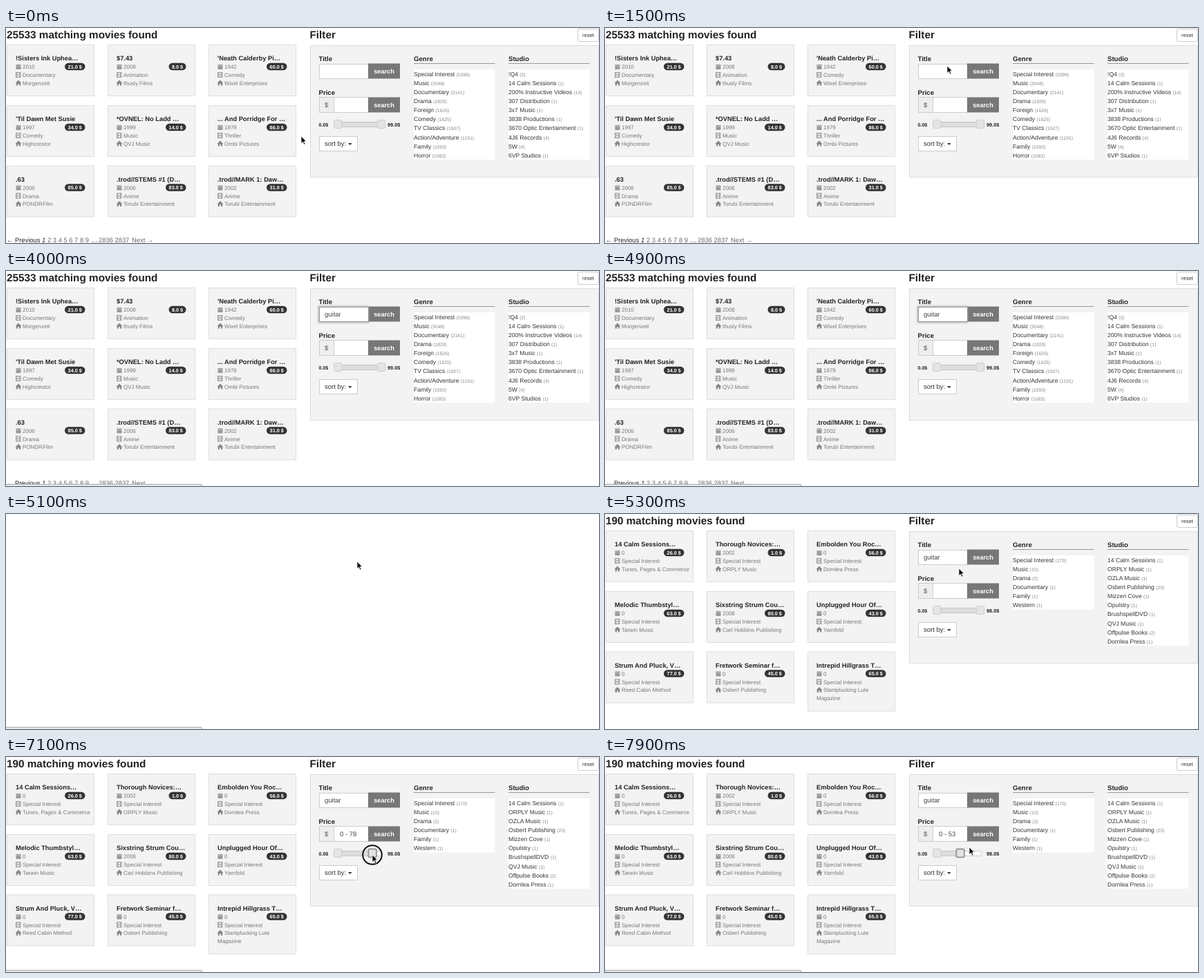
Recreate the animation shown at these times as an HTML page. Size 858 px wide and 312 px high, loop 8000 ms.

```html
<!DOCTYPE html>
<html lang="en">
<head>
<meta charset="utf-8">
<title>Movie search</title>
<style>
html, body { margin: 0; width: 100%; height: 100%; overflow: hidden; background: #fff; }
svg { display: block; font-family: "Liberation Sans", Arial, sans-serif; text-rendering: geometricPrecision; }
text { white-space: pre; }
.b { font-weight: bold; }
</style>
</head>
<body>
<svg id="stage" width="858" height="312" viewBox="0 0 858 312"></svg>
<script>
const LOOP = 8000, STEP = 100;

const text = (x, y, s, size, fill = '#333', more = '') =>
  `<text x="${x}" y="${y}" font-size="${size}" fill="${fill}" ${more}>${s.replace(/&/g, '&amp;')}</text>`;
const bold = (x, y, s, size, fill = '#222', more = '') => text(x, y, s, size, fill, 'class="b" ' + more);
const rect = (x, y, w, h, fill, stroke = 'none', more = '') =>
  `<rect x="${x}" y="${y}" width="${w}" height="${h}" fill="${fill}" stroke="${stroke}" ${more}/>`;
const path = (d, fill, more = '') => `<path d="${d}" fill="${fill}" ${more}/>`;

const icons = {
  calendar: (x, y) => rect(x, y + 1, 7, 7, '#999') + path(`M${x} ${y + 3}h7M${x + 2} ${y}v2M${x + 5} ${y}v2`, 'none', 'stroke="#ccc" stroke-width=".7"'),
  film: (x, y) => rect(x + .5, y + .5, 6.5, 7, 'none', '#999') + path(`M${x + 2} ${y}v8M${x + 5.5} ${y}v8M${x + 2} ${y + 4}h3.5`, 'none', 'stroke="#999"'),
  home: (x, y) => path(`M${x - .5} ${y + 4.5}l4.5 -4.5l4.5 4.5h-1.3v3.5h-2.2v-2.5h-2v2.5h-2.2v-3.5z`, '#888')
};

function card([title, year, genre, studio, price], i) {
  const x = 1 + i % 3 * 146, y = [25, 113, 200.5][i / 3 | 0];
  const lines = studio.split('|'), pill = price.length > 3 ? 29.5 : 25;
  return rect(x + .5, y - .5, 126, 74 + 12 * (lines.length - 1), '#f3f3f3', '#ddd') +
    bold(x + 13, y + 22.3, title, 9.3) +
    icons.calendar(x + 13.5, y + 27) + text(x + 23, y + 34, year, 8, '#777') +
    icons.film(x + 13, y + 39) + text(x + 23, y + 46, genre, 8, '#777') +
    icons.home(x + 13, y + 50.5) + text(x + 23, y + 57.7, lines[0], 8, '#777') +
    (lines[1] ? text(x + 13, y + 69.5, lines[1], 8, '#777') : '') +
    rect(x + 113.5 - pill, y + 25.7, pill, 10.6, '#333', 'none', 'rx="5.3"') +
    bold(x + 113.5 - pill / 2, y + 33.6, price + ' $', 7.3, '#fff', 'text-anchor="middle"');
}

function list(x, head, items) {
  return bold(x, 47.8, head, 9.6) + rect(x, 51, 117.5, 1, '#999') +
    rect(x, 60, 117.5, items.length * 13.1, '#fff') +
    items.map((item, i) => {
      const [name, count] = item.split('|');
      return text(x, 69.8 + i * 13.1, `${name} <tspan font-size="6.8" fill="#888">(${count})</tspan>`, 8.6);
    }).join('');
}

const button = y => rect(524, y, 46, 22, '#777') + bold(547, y + 14, 'search', 9.2, '#fff', 'text-anchor="middle"');

const filter = bold(439.5, 15.2, 'Filter', 15.3) +
  rect(827.5, 1.5, 30, 18, '#fff', '#ccc', 'rx="1"') + text(842.5, 13, 'reset', 7.6, '#333', 'text-anchor="middle"') +
  rect(440.5, 25.5, 417, 191, '#f3f3f3', '#ddd') +
  bold(452.5, 47.8, 'Title', 9.6) + rect(453.5, 52.5, 71, 21, '#fff', '#ccc') + button(51.5) +
  bold(452.5, 97, 'Price', 9.6) + rect(453.5, 100.5, 21, 22, '#eee', '#ccc') +
  text(461, 115, '$', 9.5, '#555') + rect(474.5, 100.5, 50, 22, '#fff', '#ccc') + button(100.5) +
  bold(452.5, 143, '0.0$', 7.1) +
  rect(475.5, 136.5, 69, 7, '#fff', '#ccc', 'rx="2"') +
  rect(453.5, 157.5, 55, 21, '#fff', '#ccc') + text(461, 171, 'sort by:', 9.5) + path('M495 167h5.6l-2.8 3z', '#333');

function page({ count, cards, genres, studios, max }) {
  return bold(1, 15.2, count + ' matching movies found', 15.3) + cards.map(card).join('') + filter +
    bold(552, 143, max + '$', 7.3) + list(590, 'Genre', genres) + list(727, 'Studio', studios);
}

const pager = [[1, '← Previous', '#222'], [60, '2 3 4 5 6 7 8 9', '#666'], [123, '…', '#222'],
  [134, '2836 2837', '#666'], [182, 'Next →', '#666']].map(([x, s, c]) => text(x, 310.5, s, 9.4, c)).join('') +
  text(52, 310.5, '1', 9.4, '#222', 'font-style="italic"');

const all = {
  count: 25533, max: '99.0',
  cards: [
    ['!Sisters Ink Uphea…', '2010', 'Documentary', 'Morgenzeit', '21.0'],
    ['$7.43', '2008', 'Animation', 'thusly Films', '8.0'],
    ["'Neath Calderby Pi…", '1942', 'Comedy', 'Wixel Enterprises', '60.0'],
    ["'Til Dawn Met Susie", '1997', 'Comedy', 'Highcrestor', '34.0'],
    ['*OVNEL: No Ladd …', '1999', 'Music', 'QVJ Music', '14.0'],
    ['... And Porridge For …', '1979', 'Thriller', 'Ombi Pictures', '86.0'],
    ['.63', '2006', 'Drama', 'PONDRFilm', '85.0'],
    ['.trod//STEMS #1 (D…', '2006', 'Anime', 'Torubi Entertainment', '83.0'],
    ['.trod//MARK 1: Daw…', '2002', 'Anime', 'Torubi Entertainment', '31.0']
  ],
  genres: ['Special Interest|5396', 'Music|3048', 'Documentary|2141', 'Drama|1829', 'Foreign|1626',
    'Comedy|1625', 'TV Classics|1507', 'Action/Adventure|1191', 'Family|1093', 'Horror|1083'],
  studios: ['!Q4|2', '14 Calm Sessions|1', '200% Instructive Videos|14', '307 Distribution|1', '3x7 Music|1',
    '3838 Productions|1', '3670 Optic Entertainment|1', '4J6 Records|4', '5W|4', '6VP Studios|1']
};

const found = {
  count: 190, max: '98.0',
  cards: [
    ['14 Calm Sessions…', '0', 'Special Interest', 'Tunes, Pages & Commerce', '26.0'],
    ['Thorough Novices:…', '2002', 'Special Interest', 'ORPLY Music', '1.0'],
    ['Embolden You Roc…', '0', 'Special Interest', 'Dornlea Press', '56.0'],
    ['Melodic Thumbstyl…', '0', 'Special Interest', 'Tarwin Music', '63.0'],
    ['Sixstring Strum Cou…', '2008', 'Special Interest', 'Carl Hobbins Publishing', '80.0'],
    ['Unplugged Hour Of…', '0', 'Special Interest', 'Yarnfold', '43.0'],
    ['Strum And Pluck, V…', '0', 'Special Interest', 'Reed Cabin Method', '77.0'],
    ['Fretwork Seminar f…', '0', 'Special Interest', 'Osbert Publishing', '45.0'],
    ['Intrepid Hillgrass T…', '0', 'Special Interest', 'Slantplucking Lute|Magazine', '65.0']
  ],
  genres: ['Special Interest|170', 'Music|15', 'Drama|2', 'Documentary|1', 'Family|1', 'Western|1'],
  studios: ['14 Calm Sessions|1', 'ORPLY Music|1', 'OZLA Music|1', 'Osbert Publishing|23', 'Mizzen Cove|1',
    'Opulstry|1', 'BrushspellDVD|1', 'QVJ Music|1', 'Offpulse Books|2', 'Dornlea Press|1']
};

const handle = (id, more) => rect(474.5, 133.5, 11.5, 12, '#e4e4e4', '#ccc', `rx="2" id="${id}" ${more}`);

document.getElementById('stage').innerHTML = `
  <defs><filter id="glow" x="-20%" y="-50%" width="140%" height="200%"><feGaussianBlur stdDeviation="1.5"/></filter></defs>
  <g id="before">${page(all)}${pager}</g>
  <g id="after">${page(found)}</g>
  <g id="form">
    <g id="focus">${rect(453, 52, 71, 22, 'none', '#999', 'stroke-width="2" filter="url(#glow)"')}${rect(453.5, 52.5, 71, 21, '#fff', '#999')}</g>
    ${text(461, 65.5, '', 9.5, '#444', 'id="query"')}
    ${text(483, 115, '', 9.5, '#444', 'id="price"')}
    ${rect(480, 136.5, 63, 7, '#ddd', '#c4c4c4', 'id="range"')}
    ${handle('low', '')}${handle('high', '')}
  </g>
  <g id="status">${rect(-2, 309.5, 285.5, 8, '#e8e8e8', '#aaa', 'rx="1.5"')}</g>
  <circle id="ring" r="13.8" fill="none" stroke="#111" stroke-width="2"/>
  <g id="cursor">${path('M0 0V10.5L2.5 8.2L4.3 12.2L6 11.4L4.3 7.6H7.6Z', '#000', 'stroke="#fff" stroke-width=".8"')}</g>`;

const el = id => document.getElementById(id);
const show = (id, on) => el(id).setAttribute('display', on ? 'inline' : 'none');

// Linear path through [time, ...values] keys.
function track(keys, t) {
  const n = keys.findIndex(k => k[0] > t);
  if (n < 0) return keys[keys.length - 1].slice(1);
  if (n === 0) return keys[0].slice(1);
  const a = keys[n - 1], b = keys[n], p = (t - a[0]) / (b[0] - a[0]);
  return a.slice(1).map((v, i) => v + (b[i + 1] - v) * p);
}

const pointer = [[0, 427, 157], [300, 431, 152], [800, 463, 100], [1300, 493, 57], [1500, 495, 55], [1900, 506, 67],
  [2100, 508, 69], [5200, 508, 69], [5500, 520, 99], [5800, 538.5, 132], [6100, 544, 140], [6800, 545, 141],
  [7100, 530, 142], [7500, 519, 144], [7600, 519, 144], [7900, 527, 131]];
const values = [[6800, 98], [7100, 78], [7300, 63], [7500, 53]];

function draw(t) {
  const loaded = t >= 5300, dragged = t >= 6900;
  show('before', t < 5100);
  show('after', loaded);
  show('form', t < 5100 || loaded);
  show('focus', t >= 2100 && t < 5100);
  show('status', t >= 3800 && t < 5300 || t >= 6000);
  show('cursor', t < 2600 || t >= 5100);
  show('ring', t >= 6700 && t < 7700);

  const typed = Math.max(0, Math.floor((t - 2500) / 200));
  el('query').textContent = 'guitar'.slice(0, typed);

  const value = Math.round(track(values, t)[0]), x = 480 + value * 63 / 98;
  el('price').textContent = dragged ? '0 - ' + value : '';
  el('range').setAttribute('width', x - 480);
  const high = el('high');
  high.setAttribute('x', x - 5.75);
  high.setAttribute('stroke', t >= 6700 ? '#999' : '#ccc');
  high.setAttribute('stroke-width', t >= 6700 ? 2 : 1);

  const at = `translate(${track(pointer, t)})`;
  el('cursor').setAttribute('transform', at);
  el('ring').setAttribute('transform', at);
}

const start = performance.now();
function tick() {
  const t = (performance.now() - start) % LOOP;
  draw(Math.floor(t / STEP) * STEP);
  requestAnimationFrame(tick);
}
tick();
</script>
</body>
</html>
```
